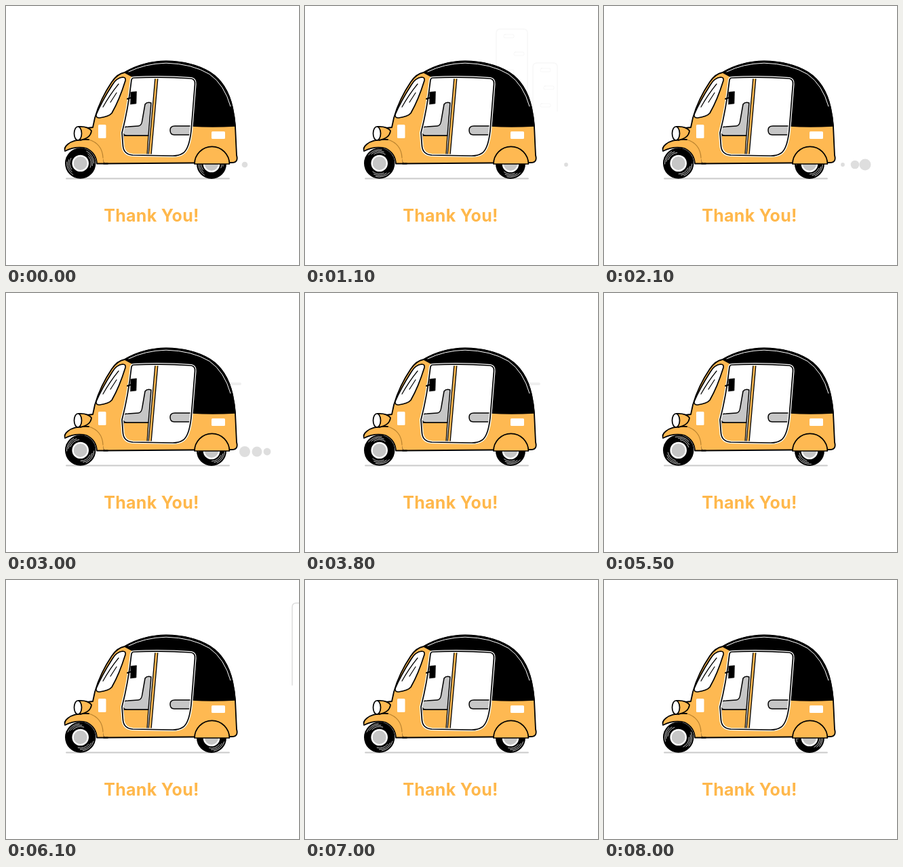
These frames come from a looping animation (432 by 382 pixels, 8.1 s). An HTML page with a canvas:

```html
<!DOCTYPE html>
<html lang="en">
<head>
<meta charset="utf-8">
<title>Thank You</title>
<style>
html, body { margin: 0; width: 100%; height: 100%; overflow: hidden; background: #fff; }
canvas { display: block; width: 432px; height: 382px; }
</style>
</head>
<body>
<canvas id="stage" width="432" height="382"></canvas>
<script>
const ctx = document.getElementById('stage').getContext('2d');
const LOOP = 8100, STEP = 100;
const YELLOW = '#feb952', BLACK = '#000', GREY = '#c6c6c6';

// Start times of the passing scenery and the smoke cycles
const TOWERS = [200, 1000, 3900, 4600, 6100];
const GUSTS = [400, 1300, 2300, 2900, 3700, 4500, 6300];
const SMOKE = [-100, 1300, 2550, 3900];
// x, full radius, start, end
const PUFFS = [[352, 8, 0, 850], [370, 8, 150, 1000], [385, 8.5, 300, 1250]];

const windshield = 'M172 105 Q163 106 157 116 Q141 141 133 160 Q132 165 138 165 Q152 163 156 158 Q167 139 176 110 Q177 105 172 105 Z';
const opening = 'M188 106 Q232 104 273 107 Q279 108 278.5 115 L273 184 Q270 211 261 217 Q255 221 246 221 L187 220 Q174 219 172.5 207 L171 187 Q180 153 185 109 Q186 106 188 106 Z';
const roofTop = 'M175 98 Q202 82 236 81.5 Q275 82 301 98 Q326 114 334 150 Q337 164 338 177';
const outline = roofTop + ' L340 220 Q343 231 333 231 L144 232.5 L138 209 L113 202 L119 180 L128 179 L131 165 Q139 137 156 112 Q164 100 175 98 Z';

const SHAPES = {
  body: new Path2D([outline, windshield, opening].join(' ')),
  outline: new Path2D(outline),
  windshield: new Path2D(windshield),
  opening: new Path2D(opening),
  roof: new Path2D(roofTop + ' Q303 179 274 177 L279 115 Q279 106 270 106 Q224 102 188 105 Z'),
  shine: new Path2D('M181 97 Q205 85 236 84.2 Q274 85 300 100.500 Q322 116 331 148'),
  glare: new Path2D('M143 149 Q153 131 166 115 M154 142 L163 128'),
  door: new Path2D('M173 191 L210 191 L208 220 L187 220 Q174 219 173 207 Z'),
  seat: new Path2D('M205 145 Q208 141 214 143 L210 191 L178 191 Q171 191 171 181 Q173 178 180 178 L195 177 Q200 177 201 168 Z'),
  rearSeat: new Path2D('M274 177 L249 177 Q242 177 242 183 Q242 190 248 190 L272 190 Z'),
  pillar: new Path2D('M220 105 L224 105 L214 220 L210 220 Z'),
  fender: new Path2D('M87 214 Q85 208 94 202 Q104 196 119 197 Q140 200 143 220 L144 232.5 L134 232.5 Q133 217 119 210 Q103 206 87 214 Z'),
  fenderEdge: new Path2D('M122 197 Q100 196 91 204 Q85 209 87 214 Q103 206 119 210 Q133 217 134 232.5 L150 232.5'),
  fenderFold: new Path2D('M122 197 Q142 203 143 224'),
  arch: new Path2D('M278 233 A25.7 25.7 0 0 1 329.400 233 Z'),
  lampCone: new Path2D('M107 178 Q120 177 126 184 Q125 195 109 198 Z'),
  lamp: new Path2D('M106 178 A5.500 10 0 0 1 106 198 A5.500 10 0 0 1 106 178 Z'),
  mirror: new Path2D('M184 127 L192.500 126 L192 144 L183.500 145 Z'),
  mirrorArm: new Path2D('M179 137 L185 135'),
  ground: new Path2D('M89 254.500 H329')
};

function stroke(path, color, width) {
  ctx.strokeStyle = color;
  ctx.lineWidth = width;
  ctx.stroke(path);
}

function paint(path, fill, line) {
  ctx.fillStyle = fill;
  ctx.fill(path);
  stroke(path, BLACK, line);
}

function disc(x, y, r, color) {
  ctx.fillStyle = color;
  ctx.beginPath();
  ctx.arc(x, y, r, 0, Math.PI * 2);
  ctx.fill();
}

function box(x, y, w, h, r) {
  const p = new Path2D();
  p.roundRect(x, y, w, h, r);
  return p;
}

function tower(x, y, w) {
  stroke(new Path2D(`M${x} 155 V${y + 6} q0 -6 6 -6 h${w - 12} q6 0 6 6 V155`), '#ddd', 1.5);
  for (let wy = y + 8, row = 0; wy < 150; wy += 26, row++) {
    const wx = row % 2 ? x + w - 20 : x + 11;
    stroke(box(wx, wy, 15, 5, 2), '#ddd', 1);
  }
}

function scenery(t) {
  for (const start of TOWERS) {
    const k = (t - start) / STEP;
    if (k < 0 || k > 2) continue;
    const x = 422 - 140 * k;
    ctx.globalAlpha = k < 0.5 ? 1 : 0.25;
    tower(x, 34, 46);
    tower(x + 54, 84, 36);
  }
  ctx.fillStyle = '#e4e4e4';
  for (const start of GUSTS) {
    const k = (t - start) / STEP;
    if (k < 0 || k > 3) continue;
    const x = 401.5 - 114.5 * k;
    ctx.globalAlpha = 0.6;
    ctx.fill(box(x, 132, 60, 4, 2));
    ctx.globalAlpha = 0.3;
    ctx.fill(box(x + 164, 146, 36, 4, 2));
    ctx.fill(box(x + 170, 182, 30, 4, 2));
  }
  ctx.globalAlpha = 1;
}

function smoke(t) {
  for (const start of SMOKE) {
    for (const [x, size, from, to] of PUFFS) {
      const p = (t - start - from) / (to - from);
      if (p > 0 && p < 1) disc(x, 234, size * Math.sin(Math.PI * p) ** 0.6, '#dedede');
    }
  }
}

function wheel(x, y, r, t) {
  disc(x, y, r, BLACK);
  ctx.save();
  ctx.translate(x, y);
  ctx.rotate(-t / LOOP * Math.PI * 18);
  ctx.strokeStyle = '#fff';
  ctx.lineWidth = 0.7;
  for (let i = 0; i < 6; i++) {
    const a = i % 2 * Math.PI - 1.1 + i * 0.1;
    ctx.beginPath();
    ctx.arc(0, 0, r - 2.5 - Math.floor(i / 2) * 2.2, a, a + 1.1);
    ctx.stroke();
  }
  ctx.restore();
  disc(x, y, 12.3, '#fff');
  disc(x, y, 10, GREY);
}

function rickshaw(t) {
  wheel(303, 233, 22, t);
  paint(SHAPES.door, YELLOW, 1.3);
  paint(SHAPES.seat, GREY, 1.5);
  paint(SHAPES.rearSeat, GREY, 1.5);
  ctx.fillStyle = YELLOW;
  ctx.fill(SHAPES.body, 'evenodd');
  paint(SHAPES.pillar, YELLOW, 1.3);
  stroke(SHAPES.outline, BLACK, 1.8);
  stroke(SHAPES.windshield, BLACK, 1.7);
  paint(SHAPES.roof, BLACK, 1.5);
  stroke(SHAPES.opening, '#fff', 4.2);
  stroke(SHAPES.opening, BLACK, 1.7);
  stroke(SHAPES.shine, '#fff', 1);
  stroke(SHAPES.glare, BLACK, 1.2);

  paint(SHAPES.mirror, BLACK, 0.5);
  stroke(SHAPES.mirrorArm, BLACK, 2);

  ctx.fillStyle = '#fff';
  ctx.fill(box(136, 175, 11.5, 20, 1.5));
  ctx.fill(box(303, 185, 20, 11, 1.5));

  paint(SHAPES.arch, YELLOW, 1.7);
  wheel(109.7, 232, 22.7, t);
  ctx.fillStyle = YELLOW;
  ctx.fill(SHAPES.fender);
  stroke(SHAPES.fenderFold, '#b9822f', 1.2);
  stroke(SHAPES.fenderEdge, BLACK, 1.8);
  paint(SHAPES.lampCone, YELLOW, 1.8);
  paint(SHAPES.lamp, '#fff', 1.7);
}

function draw(t) {
  ctx.fillStyle = '#fff';
  ctx.fillRect(0, 0, 432, 382);
  scenery(t);
  smoke(t);
  stroke(SHAPES.ground, '#cacaca', 1.8);
  rickshaw(t);
  ctx.fillStyle = '#ffb84c';
  ctx.fillText('Thank You!', 214.5, 318);
}

ctx.lineJoin = ctx.lineCap = 'round';
ctx.textAlign = 'center';
ctx.font = '700 25px Inter, "Open Sans", sans-serif';
ctx.letterSpacing = '0.3px';

const began = performance.now();
function tick() {
  const t = (performance.now() - began) % LOOP;
  draw(Math.floor(t / STEP) * STEP);
  requestAnimationFrame(tick);
}
tick();
</script>
</body>
</html>
```
